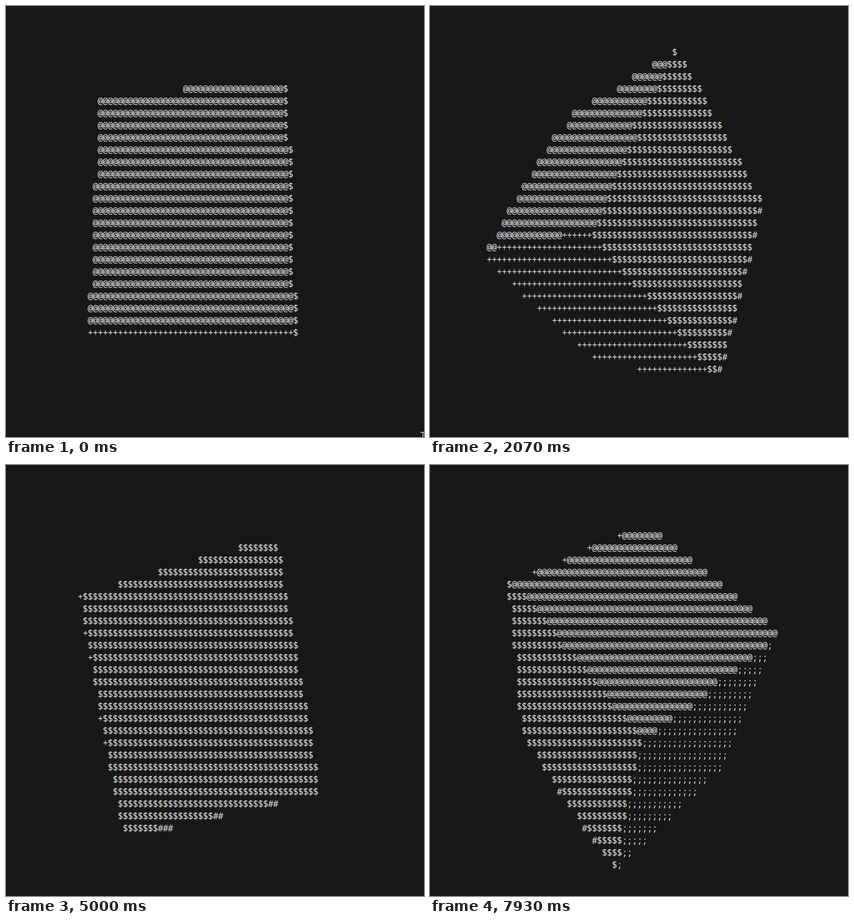
An HTML page with a canvas that plays this animation: 584x601 px, repeating every 8 s.

```html
<!DOCTYPE html>
<html lang="en">
<head>
<meta charset="utf-8">
<title>ASCII cube</title>
<style>
  html, body { margin: 0; width: 100%; height: 100%; overflow: hidden; background: #181818; }
  canvas { display: block; }
</style>
</head>
<body>
<canvas id="stage" width="584" height="601"></canvas>
<script>
const LOOP = 8000, FPS = 15;
const COLS = 160, ROWS = 44, CELL_W = 7, CELL_H = 17, LEFT = 2, TOP = -63, BASELINE = 13;
const HALF = 20, STEP = 0.6, DISTANCE = 100, ZOOM = 40, CENTER_X = 40, CENTER_Y = 22;
const ctx = document.getElementById('stage').getContext('2d', { alpha: false });

// Progress of the terminal: cube number plus the part of it printed so far.
const printed = (cube, row, col) => cube + (row + col / COLS) / ROWS;
const progress = [
  [0, printed(318, 39, 110)], [11, printed(323, 13, 64)], [31, printed(331, 13, 110)],
  [44, printed(336, 22, 20)], [75, printed(349, 1, 80)], [95, printed(357, 5, 38)],
  [119, printed(366, 37, 110)]
];

function progressAt(tick) {
  let s = 1;
  while (s < progress.length - 1 && tick > progress[s][0]) s++;
  const [t0, p0] = progress[s - 1], [t1, p1] = progress[s];
  return p0 + (p1 - p0) * (tick - t0) / (t1 - t0);
}

// Angles add up in single precision.
function angle(step, count) {
  let a = 0;
  while (count-- > 0) a = Math.fround(a + step);
  return a;
}

function renderCube(number) {
  const a = angle(0.05, number), c = angle(0.01, number);
  const sA = Math.sin(a), cA = Math.cos(a), sB = sA, cB = cA;
  const sC = Math.sin(c), cC = Math.cos(c);
  const I = [cB * cC, -cB * sC, sB];
  const J = [sA * sB * cC + cA * sC, cA * cC - sA * sB * sC, -sA * cB];
  const K = [sA * sC - cA * sB * cC, sA * cC + cA * sB * sC, cA * cB];
  const chars = new Array(COLS * ROWS).fill(' ');
  const depth = new Float32Array(COLS * ROWS);

  function plot(i, j, k, ch) {
    const [x, y, z] = [0, 1, 2].map(n => i * I[n] + j * J[n] + k * K[n]);
    const near = Math.fround(1 / (z + DISTANCE));
    const col = Math.trunc(CENTER_X + ZOOM * near * x * 2);
    const row = Math.trunc(CENTER_Y + ZOOM * near * y);
    const cell = col + row * COLS;
    if (near > depth[cell]) {
      depth[cell] = near;
      chars[cell] = ch;
    }
  }

  for (let u = -HALF; u < HALF; u += STEP) {
    for (let v = -HALF; v < HALF; v += STEP) {
      plot(u, v, -HALF, '@');
      plot(HALF, v, u, '$');
      plot(-HALF, v, -u, '~');
      plot(-u, v, HALF, '#');
      plot(u, -HALF, -v, ';');
      plot(u, HALF, v, '+');
    }
  }
  return chars;
}

const cache = new Map();
function cube(number) {
  if (!cache.has(number)) cache.set(number, renderCube(number));
  return cache.get(number);
}

// Colour-fringed screen text: each channel is shifted by a third of a pixel.
const channels = [['#cd0000', 1 / 3], ['#00cd00', 0], ['#0000cd', -1 / 3]];

function draw(tick) {
  const p = progressAt(tick), number = Math.floor(p);
  const cursor = Math.round((p - number) * ROWS * COLS);
  const fresh = cube(number), old = cube(number - 1);
  const left = cell => LEFT + (cell % COLS) * CELL_W;
  const top = cell => TOP + Math.floor(cell / COLS) * CELL_H;

  ctx.globalCompositeOperation = 'source-over';
  ctx.fillStyle = '#181818';
  ctx.fillRect(0, 0, 584, 601);

  ctx.globalCompositeOperation = 'lighter';
  ctx.font = '13px "Noto Sans Mono", monospace';
  ctx.textRendering = 'geometricPrecision';
  for (const [color, shift] of channels) {
    ctx.fillStyle = color;
    for (let cell = 0; cell < fresh.length; cell++) {
      const ch = (cell < cursor ? fresh : old)[cell];
      if (ch !== ' ') ctx.fillText(ch, left(cell) + shift, top(cell) + BASELINE);
    }
  }

  ctx.globalCompositeOperation = 'source-over';
  ctx.fillStyle = ctx.strokeStyle = '#cccccc';
  ctx.strokeRect(left(cursor) + 0.5, top(cursor) + 0.5, CELL_W - 1, CELL_H - 1);

  // Tip of the mouse pointer at the corner of the stage.
  if (tick === 0) {
    ctx.fillRect(579, 594, 5, 1);
    ctx.fillRect(582, 594, 1, 7);
  }
}

const start = performance.now();
let shown = -1;
function play(now) {
  const t = Math.max(0, now - start) % LOOP;
  const tick = Math.floor((Math.floor(t / 10) * 10 + 5) * FPS / 1000);
  if (tick !== shown) draw(shown = tick);
  requestAnimationFrame(play);
}
play(start);
</script>
</body>
</html>
```
